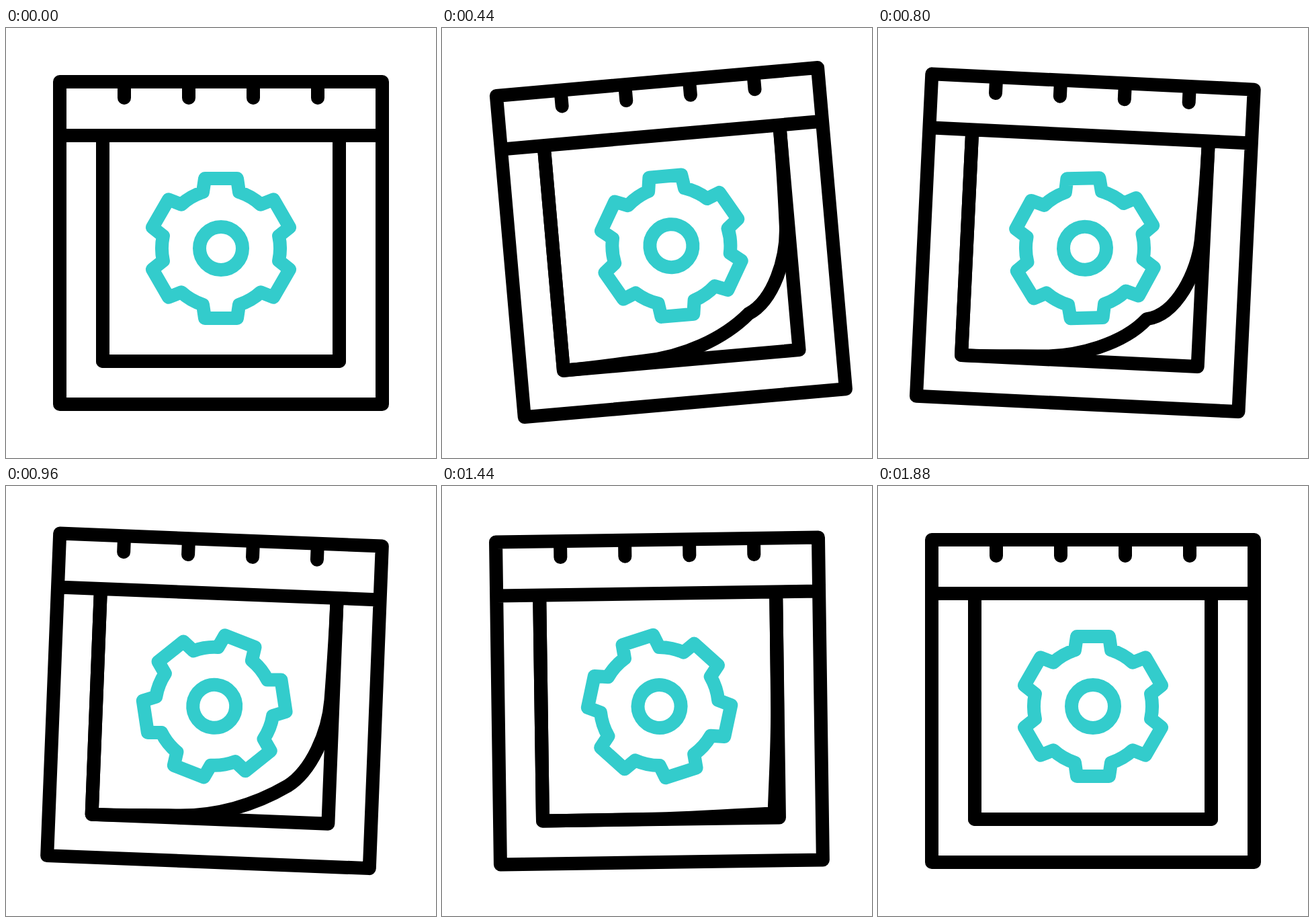
Recreate the animation shown at these times as an HTML page. Size 640 by 640 pixels, loop 2 s.

```html
<!DOCTYPE html>
<html lang="en">
<head>
<meta charset="utf-8">
<title>Calendar settings</title>
<style>
  html, body { margin: 0; width: 100%; height: 100%; overflow: hidden; background: #fff; }
  svg { display: block; width: 100%; height: 100%; }
</style>
</head>
<body>
<svg viewBox="0 0 640 640" fill="none" stroke="#000" stroke-width="20" stroke-linejoin="round">
  <g id="calendar">
    <path d="M80 80H560V560H80ZM80 160H560M144 160V496H496V160"/>
    <path d="M176 82V104M272 82V104M368 82V104M464 82V104" stroke-linecap="round"/>
    <path id="page"/>
    <g id="gear" stroke="#33cccc">
      <path id="teeth"/>
      <circle r="32"/>
    </g>
  </g>
</svg>
<script>
const LOOP = 2000, STEP = 40, LAST = 1880;
const byId = id => document.getElementById(id);
const calendar = byId('calendar'), page = byId('page'), gear = byId('gear');

// Keys are [time, value] pairs, eased in and out between neighbours.
function track(keys, t) {
  if (t <= keys[0][0]) return keys[0][1];
  for (let i = 1; i < keys.length; i++) {
    const [t0, a] = keys[i - 1], [t1, b] = keys[i];
    if (t <= t1) {
      const u = (t - t0) / (t1 - t0);
      return a + (b - a) * u * u * (3 - 2 * u);
    }
  }
  return keys[keys.length - 1][1];
}

const swing = [[0, 0], [440, -5], [840, 3], [1280, -1], [LAST, 0]];
const lift = [[0, 0], [253, -16.8], [507, 0]];
const spin = [[730, 0], [1827, -360]];
const curl = [[0, 0], [610, 1], [1620, 0]];

function gearPath() {
  const tooth = [[-27, -83.8], [-24, -104], [24, -104], [27, -83.8]];
  let d = '';
  for (let n = 0; n < 6; n++) {
    const c = Math.cos(n * Math.PI / 3), s = Math.sin(n * Math.PI / 3);
    const pts = tooth.map(([x, y]) => `${(x * c - y * s).toFixed(2)} ${(x * s + y * c).toFixed(2)}`);
    d += (n ? 'A88 88 0 0 1 ' : 'M') + pts.join('L');
  }
  return d + 'A88 88 0 0 1 -27 -83.8Z';
}

// k runs from 0 (flat page) to 1 (corner fully lifted).
function pagePath(k) {
  const corner = [496 - 87 * k, 496 - 74 * k];
  const low = [312 - 60 * k, 496 - 4.4 * k];
  const side = [496 - 4.4 * k, 328 - 22 * k];
  const off = ([x, y], dx, dy) => [x + dx, y + dy];
  const curve = (...pts) => 'C' + pts.map(p => p.map(v => v.toFixed(2)).join(' ')).join(',');
  return 'M144 160V496'
    + curve([200, 496], off(low, -50, 1.5 * k), low)
    + curve(off(low, 60, -1.2 * k), off(corner, 81 * k - 106, 42 * k), corner)
    + curve(off(corner, 48.5 * k, 86 * (k - 1)), off(side, -3 * k, 56 - 10 * k), side)
    + curve(off(side, 2.5 * k, -50), [496, 215], [496, 160]);
}

function draw(now) {
  const t = Math.min(Math.floor((now % LOOP) / STEP) * STEP, LAST);
  calendar.setAttribute('transform', `rotate(${track(swing, t)} 320 80)`);
  gear.setAttribute('transform', `translate(320 ${328 + track(lift, t)}) rotate(${track(spin, t)})`);
  page.setAttribute('d', pagePath(track(curl, t)));
}

byId('teeth').setAttribute('d', gearPath());
const start = performance.now();
function tick() {
  draw(performance.now() - start);
  requestAnimationFrame(tick);
}
tick();
</script>
</body>
</html>
```
